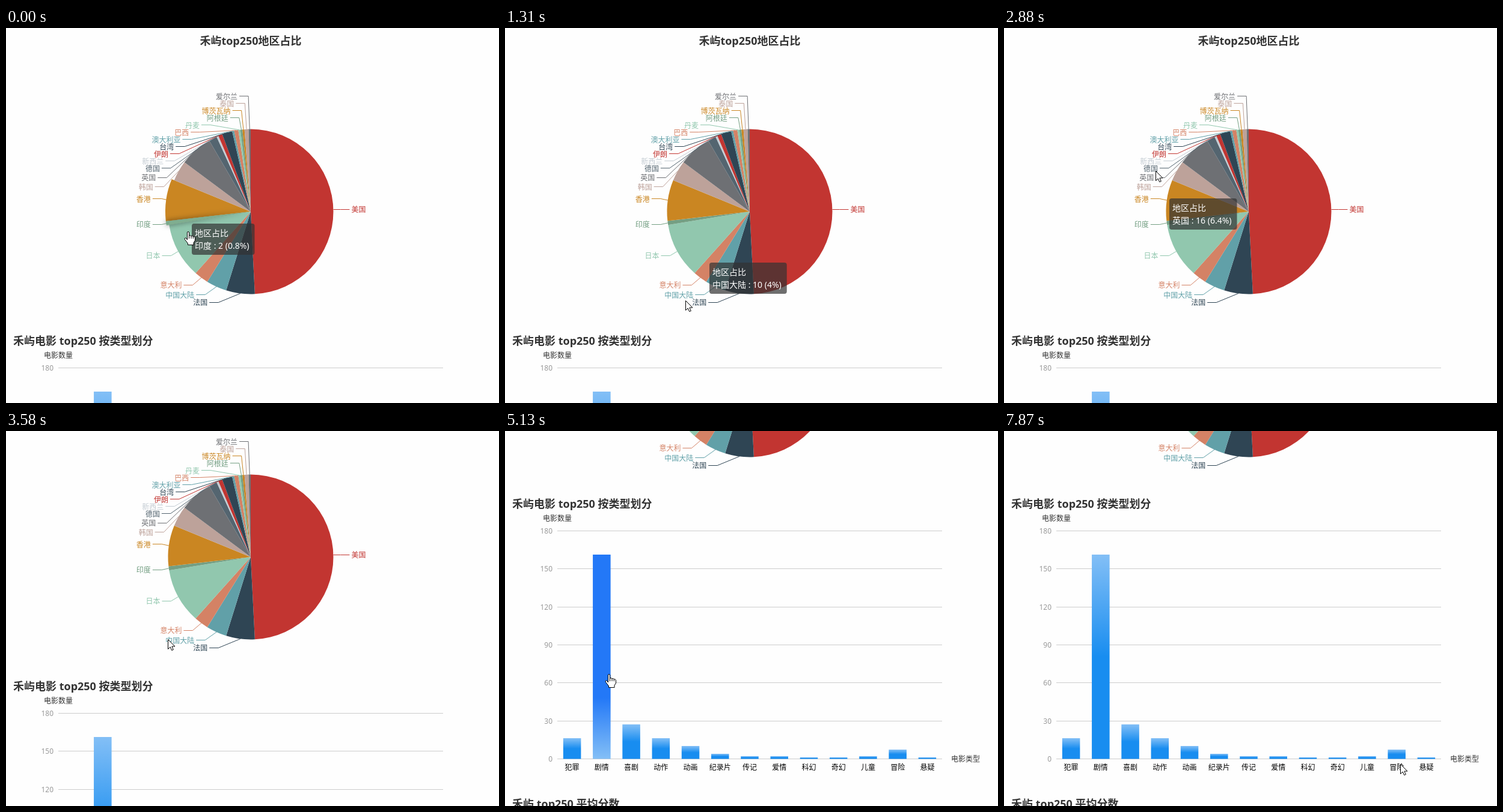
Write an HTML page with a canvas that moves like this. It is 820 by 625 pixels and loops after 7990 ms.

```html
<!DOCTYPE html>
<html lang="zh-CN">
<head>
<meta charset="utf-8">
<style>
html, body { margin: 0; width: 100%; height: 100%; overflow: hidden; background: #fefefe; }
canvas { display: block; width: 820px; height: 625px; }
</style>
</head>
<body>
<canvas id="stage" width="820" height="625"></canvas>
<script>
const ctx = document.getElementById('stage').getContext('2d');
const LOOP = 7990, STEP = 142, TAU = Math.PI * 2;
const FONT = '"Noto Sans", "Noto Sans CJK SC", "Noto Sans CJK", sans-serif';
const PALETTE = ['#c23531', '#2f4554', '#61a0a8', '#d48265', '#91c7ae', '#749f83',
  '#ca8622', '#bda29a', '#6e7074', '#546570', '#c4ccd3'];
const PIE = { x: 407, y: 306, r: 137.5 };
const AXIS = { left: 87, right: 727, top: 566.5, height: 380, max: 180 };

const regions = {
  美国: 123, 法国: 14, 中国大陆: 10, 意大利: 7, 日本: 27, 印度: 2, 香港: 20, 韩国: 10,
  英国: 16, 德国: 4, 新西兰: 1, 伊朗: 2, 台湾: 5, 澳大利亚: 1, 巴西: 2, 丹麦: 1,
  阿根廷: 1, 博茨瓦纳: 1, 泰国: 2, 爱尔兰: 1
};
const genres = {
  犯罪: 16, 剧情: 161, 喜剧: 27, 动作: 16, 动画: 10, 纪录片: 4, 传记: 2, 爱情: 2,
  科幻: 1, 奇幻: 1, 儿童: 2, 冒险: 7, 悬疑: 1
};

let angle = -TAU / 4;
const slices = Object.entries(regions).map(([name, value], i) => {
  const from = angle, to = angle += value / 250 * TAU, mid = (from + to) / 2;
  const side = Math.sign(Math.cos(mid)), reach = PIE.r + 15;
  return {
    name, value, from, to, mid, side, color: PALETTE[i % PALETTE.length],
    dx: Math.abs(reach * Math.cos(mid)) + 20, y: PIE.y + reach * Math.sin(mid)
  };
});

// Push crowded labels apart, then set them on a circle around the pie.
function layoutLabels(list, height = 12) {
  list.sort((a, b) => a.y - b.y);
  const shiftUp = (end, d) => {
    for (let j = end; j >= 0; j--) {
      list[j].y -= d;
      if (j > 0 && list[j].y > list[j - 1].y + height) break;
    }
  };
  const shiftDown = (start, d) => {
    let j = start;
    for (; j < list.length; j++) {
      list[j].y += d;
      if (j > start && list[j + 1]?.y > list[j].y + height) break;
    }
    shiftUp(Math.min(j, list.length - 1), d / 2);
  };
  for (let i = 1; i < list.length; i++) {
    const overlap = list[i - 1].y + height - list[i].y;
    if (overlap > 0) shiftDown(i, overlap);
  }
  for (const s of list) {
    const dy = Math.abs(s.y - PIE.y);
    if (dy < PIE.r + 15) s.dx = Math.sqrt((PIE.r + 30) ** 2 - dy * dy);
  }
}
for (const side of [-1, 1]) layoutLabels(slices.filter(s => s.side === side));

const SLOT = (AXIS.right - AXIS.left) / Object.keys(genres).length;
const bars = Object.entries(genres).map(([name, value], i) => {
  const h = value / AXIS.max * AXIS.height, bottom = AXIS.top + AXIS.height;
  const y = Math.floor(bottom - h);
  return { name, x: AXIS.left + SLOT * (i + 0.2), y, w: SLOT * 0.6, h: bottom - y };
});

// pointer waypoints: time, x, y, slice it points at
const path = [
  [-450, 270, 250, '香港'], [-300, 275, 273, '印度'], [0, 303, 339, '印度'],
  [280, 318, 385, '日本'], [600, 350, 410, '意大利'], [1000, 398, 426, '法国'],
  [1128, 320, 463, '中国大陆'], [1278, 300, 454, '中国大陆'], [1600, 285, 480],
  [2100, 268, 440, '中国大陆'], [2300, 262, 400, '日本'], [2690, 255, 264, '英国'],
  [2840, 252, 238, '英国'], [3100, 255, 245], [3300, 269, 347], [3660, 269, 347, '中国大陆'],
  [4600, 269, 347], [4820, 173, 405], [5112, 173, 405], [5400, 185, 480], [5800, 104, 528],
  [6130, 206, 532], [6400, 260, 530], [6680, 264, 535], [7000, 380, 560], [7610, 646, 548],
  [7800, 659, 555]
];
const legAt = t => path.findLastIndex(k => k[0] <= t);
const sliceAt = t => slices.find(s => s.name === path[legAt(t)][3]);
function pointerAt(t) {
  const i = legAt(t), [t0, x0, y0] = path[i], [t1, x1, y1] = path[i + 1] || path[i];
  const p = t1 > t0 ? (t - t0) / (t1 - t0) : 0;
  return [x0 + (x1 - x0) * p, y0 + (y1 - y0) * p];
}

// Four wheel notches of 100 px, each easing out.
function scrollAt(t) {
  let sum = 0;
  for (let i = 0; i < 4; i++) {
    const p = Math.min(1, Math.max(0, (t - 3400 - 230 * i) / 190));
    sum += 100 * (1 - (1 - p) ** 2);
  }
  return Math.round(sum);
}

function text(str, x, y, size, color, align = 'left', weight = 400) {
  ctx.font = `${weight} ${size}px ${FONT}`;
  ctx.fillStyle = color;
  ctx.textAlign = align;
  ctx.fillText(str, x, y + size * 0.37);
}

function line(points, color) {
  ctx.beginPath();
  points.forEach(([x, y]) => ctx.lineTo(x, y));
  ctx.strokeStyle = color;
  ctx.lineWidth = 1;
  ctx.stroke();
}

function wedge(s, r) {
  ctx.beginPath();
  ctx.moveTo(PIE.x, PIE.y);
  ctx.arc(PIE.x, PIE.y, r, s.from, s.to);
  ctx.closePath();
  ctx.fillStyle = s.color;
  ctx.fill();
}

function drawPie(t, onPie) {
  const active = sliceAt(t), leaving = sliceAt(t - 400);
  const raisedRadius = PIE.r + (onPie ? 4.5 : 0);
  for (const s of slices) wedge(s, s === leaving ? raisedRadius : PIE.r);
  if (active && active === sliceAt(t - 250)) {
    ctx.save();
    ctx.shadowColor = 'rgba(0,0,0,.5)';
    ctx.shadowBlur = 10;
    ctx.filter = 'brightness(1.1)';
    wedge(active, raisedRadius);
    ctx.restore();
  }
  for (const s of slices) {
    const x = PIE.x + s.side * s.dx, y = Math.floor(s.y) + 0.5;
    line([[PIE.x + PIE.r * Math.cos(s.mid), PIE.y + PIE.r * Math.sin(s.mid)],
      [x - 18 * s.side, y], [x - 3 * s.side, y]], s.color);
    text(s.name, x, Math.round(s.y) + 0.5, 12, s.color, s.side < 0 ? 'right' : 'left');
  }
}

function drawBars(hovered) {
  text('电影数量', 87, 546, 12, '#333', 'center');
  for (let i = 0; i <= 6; i++) {
    const y = Math.floor(AXIS.top + AXIS.height * i / 6) + 0.5;
    line([[AXIS.left, y], [AXIS.right, y]], '#ccc');
    text(AXIS.max - 30 * i, 79, y, 12, '#999', 'right');
  }
  for (const b of bars) {
    const g = ctx.createLinearGradient(0, b.y, 0, b.y + b.h);
    const stops = b === hovered
      ? [[0, '#2378f7'], [0.7, '#2378f7'], [1, '#83bff6']]
      : [[0, '#83bff6'], [0.5, '#188df0'], [1, '#188df0']];
    stops.forEach(s => g.addColorStop(...s));
    ctx.fillStyle = g;
    ctx.fillRect(b.x, b.y, b.w, b.h);
    text(b.name, b.x + b.w / 2, 961, 12, '#000', 'center');
  }
  text('电影类型', 742, 947, 12, '#333');
}

// The box trails the pointer and flips above it near the chart's lower edge.
function drawTip(t) {
  const s = sliceAt(t);
  if (!s) return;
  const [px, py] = pointerAt(t - 150);
  const pageY = py + Math.min(scrollAt(t), 100);
  const x = px + 20, y = pageY > 428 ? pageY - 72 : pageY + 20;
  const label = `${s.name} : ${s.value} (${+(s.value * 0.4).toFixed(1)}%)`;
  ctx.font = `14px ${FONT}`;
  ctx.beginPath();
  ctx.roundRect(x, y, ctx.measureText(label).width + 14, 52, 4);
  ctx.fillStyle = 'rgba(50,50,50,.7)';
  ctx.fill();
  text('地区占比', x + 5, y + 16, 14, '#fff');
  text(label, x + 5, y + 37, 14, '#fff');
}

const arrow = new Path2D('M.5 .5V16.5L4.2 13L6.7 18.6L9.3 17.5L6.9 12H12Z');
const hand = new Path2D('M-1.5 14V2Q-1.5 .5 0 .5T1.5 2V8Q1.5 6.5 3.2 6.6T5 8.5Q5 7.2 6.6 7.4' +
  'T8.3 9.3Q8.5 8.3 9.8 8.6T11.5 11V15L9 19V22.5H-.5V20L-5.5 13.5Q-6.5 11.5 -5 10.8T-1.5 14Z' +
  'M1.5 8V12M5 8.5V12M8.3 9.3V12');
function drawPointer(x, y, shape) {
  ctx.save();
  ctx.translate(x, y);
  ctx.fillStyle = '#fff';
  ctx.strokeStyle = '#000';
  ctx.lineWidth = 1;
  ctx.fill(shape);
  ctx.stroke(shape);
  ctx.restore();
}

function draw(now) {
  const t = Math.floor(now % LOOP / STEP) * STEP;
  const [px, py] = pointerAt(t).map(Math.round);
  const scroll = scrollAt(t), pageY = py + scroll;
  const bar = bars.find(b => px >= b.x && px <= b.x + b.w && pageY >= b.y && pageY <= b.y + b.h);
  const onPie = Math.hypot(px - PIE.x, pageY - PIE.y) < PIE.r;

  ctx.fillStyle = '#fefefe';
  ctx.fillRect(0, 0, 820, 625);
  ctx.save();
  ctx.translate(0, -scroll);
  text('禾屿top250地区占比', 407, 21, 18, '#333', 'center', 700);
  drawPie(t, onPie);
  text('禾屿电影 top250 按类型划分', 12, 521, 18, '#333', 'left', 700);
  drawBars(bar);
  text('禾屿 top250 平均分数', 12, 1021, 18, '#333', 'left', 700);
  drawTip(t);
  ctx.restore();
  drawPointer(px, py, bar || onPie ? hand : arrow);
}

const start = performance.now();
function loop() {
  draw(performance.now() - start);
  requestAnimationFrame(loop);
}
loop();
</script>
</body>
</html>
```
